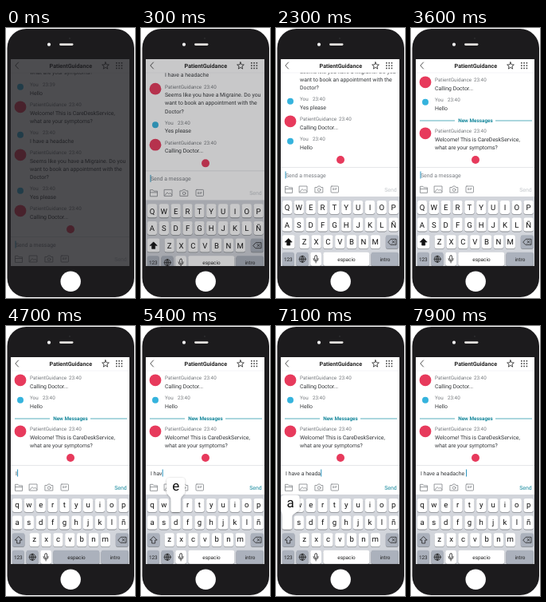
Write an HTML page that moves like this. It is 162 by 338 pixels and loops after 8 s.

```html
<!DOCTYPE html>
<html lang="en">
<head>
<meta charset="utf-8">
<title>Chat on a phone</title>
<style>
  html, body { margin: 0; width: 100%; height: 100%; overflow: hidden; background: #fff; }
  svg { display: block; width: 100%; height: 100%; }
  text { font-family: Roboto, "Open Sans", Arial, sans-serif; text-rendering: geometricPrecision; white-space: pre; }
  .body { font-size: 6.9px; fill: #333639; }
  .name { font-size: 6.3px; fill: #75797d; }
  .title { font-size: 7.2px; font-weight: 700; fill: #222; }
  .news { font-size: 6.4px; font-weight: 700; fill: #16889c; }
  .key { font-size: 9.6px; fill: #111; }
  .label { font-size: 6.4px; fill: #222; }
  .big { font-size: 17px; fill: #111; }
  .mid { text-anchor: middle; }
  .icon { fill: none; stroke: #808488; stroke-width: .8; stroke-linejoin: round; stroke-linecap: round; }
  .dark { stroke: #222; }
</style>
</head>
<body>
<svg viewBox="0 0 162 338" id="stage">
  <defs>
    <clipPath id="screen"><rect x="6" y="39" width="149" height="259"/></clipPath>
    <clipPath id="chatArea"><rect x="6" y="56" width="149" height="242"/></clipPath>
    <filter id="lift" x="-30%" y="-30%" width="160%" height="160%">
      <feDropShadow dx="0" dy=".6" stdDeviation="1" flood-opacity=".35"/>
    </filter>
  </defs>
  <rect width="162" height="338" fill="#fff"/>
  <rect x="1.5" y="1" width="159.5" height="336" rx="24" fill="#1c1b1d"/>
  <circle cx="80" cy="13" r=".8" fill="#3a393c"/>
  <circle cx="54" cy="20.7" r="2.1" fill="#f4f4f4"/>
  <rect x="67" y="19.2" width="17.5" height="2.8" rx="1.4" fill="#e4e2df"/>
  <circle cx="81.2" cy="317.3" r="12.7" fill="#fff"/>

  <g clip-path="url(#screen)">
    <rect x="6" y="39" width="149" height="259" fill="#fff"/>
    <g clip-path="url(#chatArea)">
      <g id="panel">
        <g id="chat"></g>
        <rect x="6" y="158.5" width="149" height="142" fill="#fff"/>
        <circle cx="81" cy="165" r="5" fill="#e73a5c"/>
        <path d="M6 174.5H155" stroke="#dadde0" stroke-width=".7"/>
        <text id="hint" class="body" x="12" y="186.5" style="fill:#777b80">Send a message</text>
        <text id="draft" class="body" x="12" y="186.5"></text>
        <rect id="caret" y="179.5" width=".9" height="9" fill="#1689b8"/>
        <g class="icon">
          <path d="M11.5 206V198.3H15L16.2 199.8H20.5V206ZM11.5 201.5H20.5"/>
          <path d="M29.5 198H39V206H29.5ZM30 205L33 201.5L35 203.5L36.5 202L38.8 204.5"/>
          <path d="M49.3 199.5H51.8L52.8 198H55.4L56.4 199.5H58.8V206H49.3Z"/>
          <circle cx="54.1" cy="202.6" r="1.8"/>
          <rect x="69" y="198" width="9.5" height="8" rx="1"/>
        </g>
        <text class="mid" x="73.7" y="203.4" font-size="3.8" font-weight="700" fill="#808488">GIF</text>
        <text id="send" class="body mid" x="144" y="204.5">Send</text>
        <rect x="6" y="211" width="149" height="89" fill="#d2d5db"/>
        <g id="keys"></g>
        <g id="popup">
          <path id="bubble" fill="#fff" filter="url(#lift)"/>
          <text id="bigKey" class="big mid"></text>
        </g>
      </g>
    </g>
    <path d="M15.5 43L11.8 47L15.5 51" class="icon dark"/>
    <text class="title mid" x="81.3" y="49.7">PatientGuidance</text>
    <path id="star" class="icon dark"/>
    <g id="grid" fill="#444"></g>
    <path d="M6 56H155" stroke="#e8eaec" stroke-width=".5"/>
    <rect id="dim" x="6" y="39" width="149" height="259" fill="#1c1b1f"/>
  </g>
</svg>
<script>
const LOOP = 8000, STEP = 100, HOLD = 200;
const BOT = 'PatientGuidance', PINK = '#e73a5c', BLUE = '#35b3dd';
const $ = id => document.getElementById(id);

function add(parent, tag, attrs, text) {
  const el = document.createElementNS('http://www.w3.org/2000/svg', tag);
  for (const k in attrs) el.setAttribute(k, attrs[k]);
  if (text !== undefined) el.textContent = text;
  parent.append(el);
  return el;
}

// Header marks
$('star').setAttribute('d', 'M' + Array.from({ length: 10 }, (_, i) => {
  const r = i % 2 ? 2 : 4.6, a = (i / 5 - .5) * Math.PI;
  return (125 + r * Math.cos(a)).toFixed(2) + ' ' + (47.4 + r * Math.sin(a)).toFixed(2);
}).join('L') + 'Z');
for (let i = 0; i < 9; i++)
  add($('grid'), 'rect', { x: 138 + i % 3 * 3.3, y: 43 + Math.floor(i / 3) * 3.3, width: 1.6, height: 1.6 });

// Conversation
function message(y, who, time, ...lines) {
  const chat = $('chat'), bot = who === BOT;
  add(chat, 'circle', { cx: 18, cy: y + 2.8, r: bot ? 7.4 : 4, fill: bot ? PINK : BLUE });
  add(chat, 'text', { class: 'name', x: 30, y: y + 2.3 }, who);
  add(chat, 'text', { class: 'name', x: bot ? 79 : 46, y: y + 2.3 }, time);
  lines.forEach((line, i) => add(chat, 'text', { class: 'body', x: 30, y: y + 13 + i * 10.1 }, line));
}
const welcome = ['Welcome! This is CareDeskService,', 'what are your symptoms?'];
message(-52, BOT, '23:39', ...welcome);
message(-16, 'You', '23:39', 'Hello');
message(9, BOT, '23:40', ...welcome);
message(44, 'You', '23:40', 'I have a headache');
message(69, BOT, '23:40', 'Seems like you have a Migraine. Do you', 'want to book an appointment with the', 'Doctor?');
message(114, 'You', '23:40', 'Yes please');
message(139, BOT, '23:40', 'Calling Doctor...');
message(164, 'You', '23:40', 'Hello');
add($('chat'), 'path', { d: 'M11 190H55M106 190H152', stroke: '#2b9aad', 'stroke-width': .8 });
add($('chat'), 'text', { class: 'news mid', x: 81, y: 192.2 }, 'New Messages');
message(203, BOT, '23:40', ...welcome);

// Keyboard
const GREY = '#abb1bc', keys = {};
function cap(x, y, w, fill) {
  add($('keys'), 'rect', { x, y: y + .8, width: w, height: 17, rx: 2.4, fill: '#898c91' });
  return add($('keys'), 'rect', { x, y, width: w, height: 17, rx: 2.4, fill });
}
['qwertyuiop', 'asdfghjklñ', 'zxcvbnm'].forEach((row, r) => [...row].forEach((ch, i) => {
  const cx = (r === 2 ? 35.7 : 14) + i * 14.85, y = 216 + r * 21.6;
  cap(cx - 6.1, y, 12.2, '#fff');
  keys[ch] = { cx, y, label: add($('keys'), 'text', { class: 'key mid', x: cx }) };
}));
const shiftKey = cap(7.9, 259.2, 15.6, GREY);
const arrow = add($('keys'), 'path', { d: 'M15.7 263.5L20.2 268H17.7V272H13.7V268H11.2Z', stroke: '#222', 'stroke-width': .8 });
const eraseKey = cap(137.8, 259.2, 16, GREY);
add($('keys'), 'path', { class: 'icon dark', d: 'M141 267.8L144.2 264.3H151V271.3H144.2ZM146 266.3L149 269.3M149 266.3L146 269.3' });
[[7.9, 14.9], [25.5, 15], [119.5, 34.3]].forEach(([x, w]) => cap(x, 280.8, w, GREY));
cap(43.2, 280.8, 13.8, '#fff');
const spaceKey = cap(59.3, 280.8, 58, '#fff');
[[15.3, '123'], [88.5, 'espacio'], [137, 'intro']].forEach(([x, s]) =>
  add($('keys'), 'text', { class: 'label mid', x, y: 291.5 }, s));
add($('keys'), 'circle', { class: 'icon dark', cx: 33.2, cy: 289.3, r: 4 });
add($('keys'), 'path', { class: 'icon dark', d: 'M29.2 289.3H37.2M33.2 285.3V293.3M33.2 285.3Q29.6 289.3 33.2 293.3Q36.8 289.3 33.2 285.3' });
add($('keys'), 'rect', { class: 'icon dark', x: 48.7, y: 284.7, width: 2.8, height: 5.8, rx: 1.4 });
add($('keys'), 'path', { class: 'icon dark', d: 'M47 288.5Q47 292 50.1 292T53.2 288.5M50.1 292V294' });

// Key presses: time and key; '<' erases, '!' sends
const presses = [
  [700, 'h'], [900, 'e'], [1100, 'l'], [1300, 'l'], [1500, 'o'], [1900, '!'],
  [4600, 'i'], [4700, ' '], [4900, 'h'], [5100, 'a'], [5200, 'v'], [5400, 'e'], [5500, ' '],
  [5700, 'a'], [5800, ' '], [6000, 'h'], [6100, 'e'], [6300, 'q'], [6600, '<'], [6700, 'a'],
  [6900, 'd'], [7000, 'a'], [7200, 'c'], [7300, 'h'], [7500, 'e'], [7700, ' ']
];
const type = (s, k) => k === '!' ? '' : k === '<' ? s.slice(0, -1) : s + (s ? k : k.toUpperCase());
const typed = t => presses.reduce((s, [at, k]) => at + STEP <= t ? type(s, k) : s, '');
const easeOut = (t, start, span) => 1 - (1 - Math.min(1, Math.max(0, (t - start) / span))) ** 3;

function showPopup(key, upper) {
  $('popup').style.display = key ? '' : 'none';
  if (!key) return;
  const { cx, y } = key;
  const l = Math.min(131.5, Math.max(6.5, cx - 11.5)), r = l + 23, a = cx - 6.1, b = cx + 6.1;
  $('bubble').setAttribute('d',
    `M${l + 4} ${y - 26}H${r - 4}Q${r} ${y - 26} ${r} ${y - 22}V${y - 9}C${r} ${y - 4} ${b} ${y - 4} ${b} ${y + 2}` +
    `V${y + 15}Q${b} ${y + 17} ${b - 2} ${y + 17}H${a + 2}Q${a} ${y + 17} ${a} ${y + 15}V${y + 2}` +
    `C${a} ${y - 4} ${l} ${y - 4} ${l} ${y - 9}V${y - 22}Q${l} ${y - 26} ${l + 4} ${y - 26}Z`);
  $('bigKey').textContent = upper ? key.ch.toUpperCase() : key.ch;
  $('bigKey').setAttribute('x', (l + r) / 2);
  $('bigKey').setAttribute('y', y - 10.5);
}

function draw(t) {
  $('dim').setAttribute('opacity', Math.max(0, .78 - t * .0018));
  $('panel').setAttribute('transform', `translate(0 ${87 * (1 - easeOut(t, 100, 317))})`);
  $('chat').setAttribute('transform', `translate(0 ${-25 * easeOut(t, 1900, 200) - 49 * easeOut(t, 2900, 200)})`);

  const text = typed(t), upper = !text;
  $('draft').textContent = text;
  $('hint').style.display = text ? 'none' : '';
  $('send').style.fill = text ? '#16889c' : '#c3c7cb';
  $('caret').setAttribute('x', text ? 12.3 + $('draft').getComputedTextLength() : 11.6);
  const idle = t >= 2300 && t < 4600;
  $('caret').style.display = idle && (t - 2300) % 1000 >= 600 ? 'none' : '';

  for (const ch in keys) {
    const { label, y } = keys[ch];
    label.textContent = upper ? ch.toUpperCase() : ch;
    label.setAttribute('y', y + (upper ? 12.2 : 11.2));
  }
  shiftKey.setAttribute('fill', upper ? '#fff' : GREY);
  arrow.setAttribute('fill', upper ? '#111' : 'none');

  const last = presses.filter(([at]) => at <= t && t < at + HOLD).pop();
  const ch = last ? last[1] : '';
  spaceKey.setAttribute('fill', ch === ' ' ? GREY : '#fff');
  eraseKey.setAttribute('fill', ch === '<' ? '#fff' : GREY);
  showPopup(keys[ch] && { ...keys[ch], ch }, last && !typed(last[0]));
}

function frame() {
  const t = performance.now() % LOOP;
  draw(t - t % STEP);
  requestAnimationFrame(frame);
}
draw(0);
requestAnimationFrame(frame);
</script>
</body>
</html>
```
